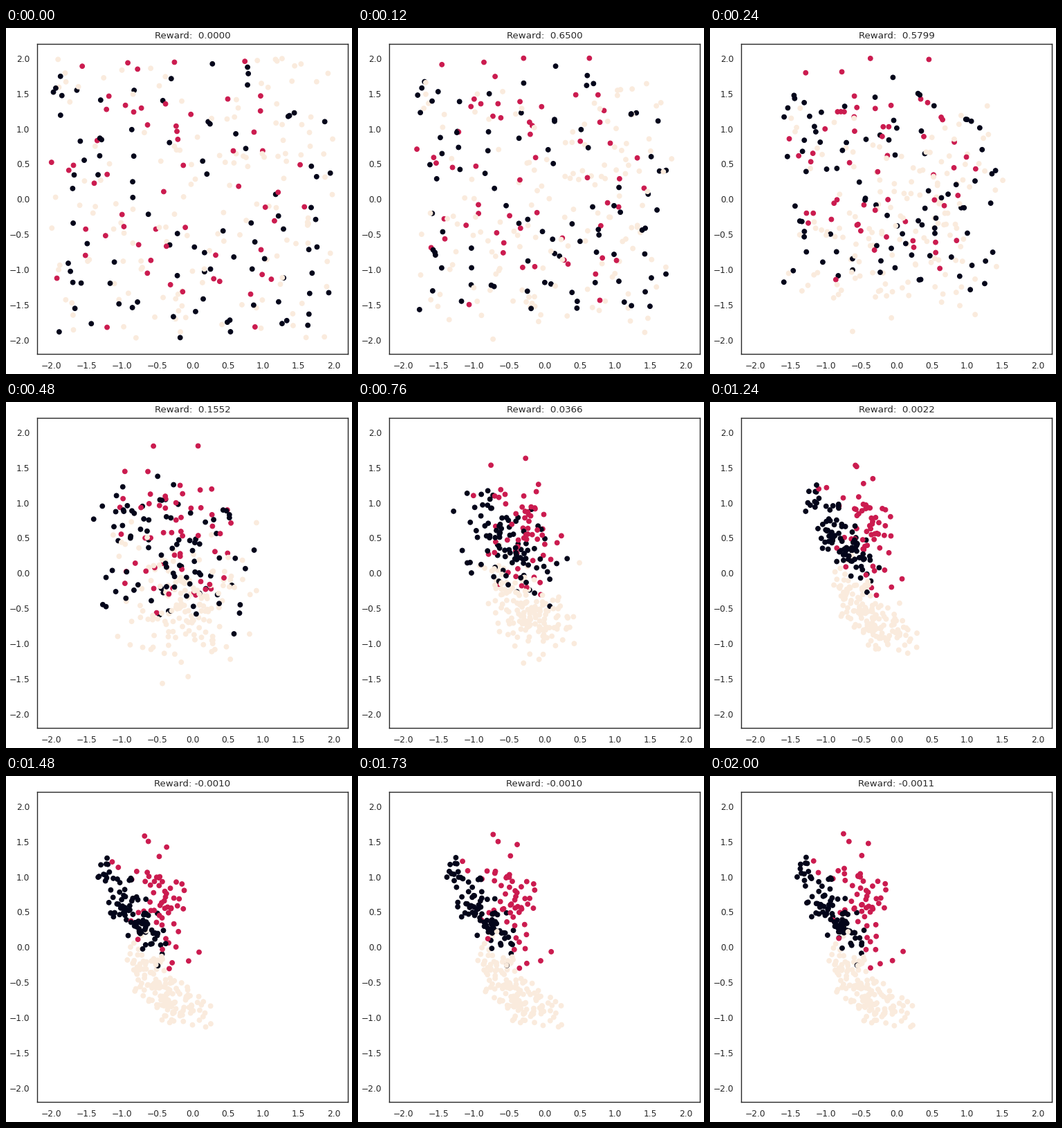
A matplotlib script for the animation above (2030 ms loop, 500 by 500 pixels).

```python
import numpy as np
import matplotlib.pyplot as plt
from matplotlib.animation import FuncAnimation

SIZE, DPI = 500, 80
LOOP, TICK = 2030, 10
INK = "0.15"
plt.rcParams["font.family"] = "DejaVu Sans"

# Per class: colour, count, home, angle of the long axis, spreads, bend, pace.
CLASSES = [
    ("#03051a", 92, (-.95, .53), -53, (.42, .13), 0, .85),
    ("#cb1b4f", 59, (-.52, .68), -72, (.46, .22), 0, .80),
    ("#faebdd", 149, (-.43, -.63), -47, (.38, .14), .05, 1.2),
]


def step_time(t):
    """The picture advances every 30 ms, with a 40 ms hold at 480 and 1480."""
    late = 10 * ((t >= 490) + (t >= 1490))
    return (t - late) // 30 * 30 + late


def arrive(t, tau, power):
    return 1 - np.exp(-(t / tau) ** power)


def settled(n, angle, spread, bend, rng):
    """Offsets from home in a tilted, slightly bent ellipse."""
    u, v = np.clip(rng.normal(size=(2, n)), -2.1, 2.1)
    along, side = spread[0] * u, spread[1] * v + bend * (u * u - 1)
    c, s = np.cos(np.radians(angle)), np.sin(np.radians(angle))
    return np.column_stack([along * c - side * s, along * s + side * c])


rng = np.random.default_rng(11)
parts = []
for color, n, home, angle, spread, bend, pace in CLASSES:
    parts.append((
        np.full(n, color),
        np.tile(home, (n, 1)),
        settled(n, angle, spread, bend, rng),
        pace * np.exp(rng.normal(0, .35, (n, 1))),
    ))
colors, homes, rest, paces = map(np.concatenate, zip(*parts))
order = rng.permutation(len(colors))
colors, homes, rest, paces = (a[order] for a in (colors, homes, rest, paces))
begin = rng.uniform(-2, 2, homes.shape)


def places(t):
    # Classes part quickly in height and more slowly sideways.
    drift = homes * [arrive(t, 870, 1.65), arrive(t, 400, 1)]
    near = 1 - np.exp(-paces * (t / 470) ** 1.5)
    return np.clip(drift + (1 - near) * begin + near * rest, -2, 2)


def reward(t):
    """Rises at once, then fades to just below zero."""
    times = [0, 30, 120, 240, 480, 760, 1000, 1480, 2000]
    values = np.array([0, .4, .65, .5799, .1552, .0366, .0108, -.0010, -.0011])
    return np.sinh(np.interp(t, times, np.arcsinh(values * 500))) / 500


fig = plt.figure(figsize=(SIZE / DPI, SIZE / DPI), dpi=DPI, facecolor="white")
left, right, top, bottom = 45, 494, 23.3, 471.4
ax = fig.add_axes([left / SIZE, 1 - bottom / SIZE,
                   (right - left) / SIZE, (bottom - top) / SIZE])
ticks = np.arange(-2, 2.1, .5)
ax.set(xlim=(-2.2, 2.2), ylim=(-2.2, 2.2), xticks=ticks, yticks=ticks)
ax.tick_params(length=0, pad=9.5, labelsize=11, labelcolor=INK)
for spine in ax.spines.values():
    spine.set(color=INK, linewidth=1.25)

title = ax.set_title("", fontsize=12, color=INK, pad=7.5)
dots = ax.scatter(*places(0).T, s=36, c=colors, linewidths=1)


def draw(i):
    t = step_time(i * TICK)
    dots.set_offsets(places(t))
    title.set_text(f"Reward: {reward(t): .4f}")
    return dots, title


anim = FuncAnimation(fig, draw, frames=LOOP // TICK, interval=TICK,
                     repeat=True, repeat_delay=0, blit=False)
plt.show()
```
